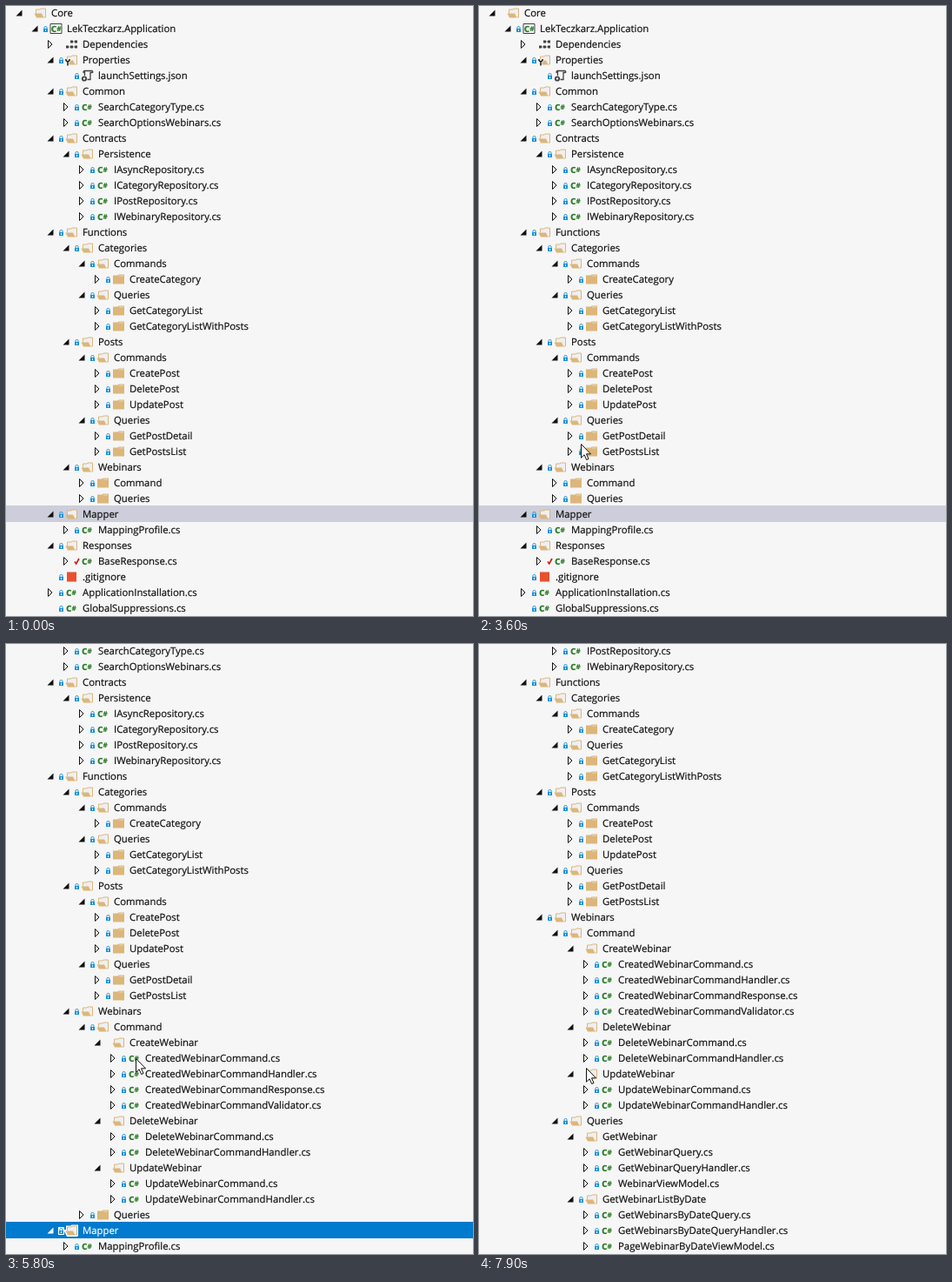
An HTML page for the animation above (8000 ms loop, 537x701 px).

```html
<!DOCTYPE html>
<html lang="en">
<head>
<meta charset="utf-8">
<title>Solution tree</title>
<style>
  html, body { margin: 0; width: 100%; height: 100%; overflow: hidden; background: #f6f6f6; }
  svg { display: block; width: 537px; height: 701px; }
  text { font-family: "Open Sans", "Noto Sans", sans-serif; font-size: 11.35px; text-rendering: geometricPrecision; white-space: pre; }
  .name { stroke-width: .2px; }
  .cs { font-size: 10px; font-weight: 800; fill: #2f7d2c; }
  .cs tspan { font-size: 8px; }
  .tip { font-size: 11.4px; fill: #575757; }
</style>
</head>
<body>
<svg viewBox="0 0 537 701">
  <rect width="537" height="701" fill="#f6f6f6"/>
  <g id="rows"></g>
  <g id="tip">
    <rect x=".5" y=".5" width="72" height="24" fill="#f6f6f6" stroke="#767676"/>
    <text class="tip" x="7" y="17">Checked in</text>
  </g>
  <path id="cursor" d="M.5 .5V16.2L4.1 12.8L6.7 18.5L9 17.5L6.5 11.8H11.5Z" fill="#fff" stroke="#111" stroke-width="1"/>
</svg>
<script>
const LOOP = 8000, STEP = 100, ROW = 18, VISIBLE = 39;

// depth, arrow (v open, > closed, . none, a/b opened later), icon, mark, name
const tree = `
0vf- Core
1vpl LekTeczkarz.Application
2>d- Dependencies
2vwl Properties
3.jl launchSettings.json
2vfl Common
3>cl SearchCategoryType.cs
3>cl SearchOptionsWebinars.cs
2vfl Contracts
3vfl Persistence
4>cl IAsyncRepository.cs
4>cl ICategoryRepository.cs
4>cl IPostRepository.cs
4>cl IWebinaryRepository.cs
2vfl Functions
3vfl Categories
4vfl Commands
5>fl CreateCategory
4vfl Queries
5>fl GetCategoryList
5>fl GetCategoryListWithPosts
3vfl Posts
4vfl Commands
5>fl CreatePost
5>fl DeletePost
5>fl UpdatePost
4vfl Queries
5>fl GetPostDetail
5>fl GetPostsList
3vfl Webinars
4afl Command
5vf- CreateWebinar
6>cl CreatedWebinarCommand.cs
6>cl CreatedWebinarCommandHandler.cs
6>cl CreatedWebinarCommandResponse.cs
6>cl CreatedWebinarCommandValidator.cs
5vf- DeleteWebinar
6>cl DeleteWebinarCommand.cs
6>cl DeleteWebinarCommandHandler.cs
5vf- UpdateWebinar
6>cl UpdateWebinarCommand.cs
6>cl UpdateWebinarCommandHandler.cs
4bfl Queries
5vf- GetWebinar
6>cl GetWebinarQuery.cs
6>cl GetWebinarQueryHandler.cs
6>cl WebinarViewModel.cs
5vfl GetWebinarListByDate
6>cl GetWebinarsByDateQuery.cs
6>cl GetWebinarsByDateQueryHandler.cs
6>cl PageWebinarByDateViewModel.cs
2vfl Mapper
3>cl MappingProfile.cs
2vfl Responses
3>cr BaseResponse.cs
2.gl .gitignore
2>cl ApplicationInstallation.cs
2.cl GlobalSuppressions.cs
1vpl LekTeczkarz.Domain
2>d- Dependencies
2>fl Common`.trim().split('\n').map(line => {
  const [depth, arrow, icon, mark] = line;
  return { depth: +depth, arrow, icon, mark, name: line.slice(5) };
});

// time, x, y of the pointer tip
const pointer = [
  [100, 522, 35], [500, 522, 35], [1400, 197, 176], [2000, 122, 280], [2200, 126, 300],
  [2300, 129, 305], [3200, 116, 435], [3600, 117, 503], [4100, 117, 503], [4200, 117, 504],
  [4400, 117, 504], [4700, 98, 505], [4900, 88, 492], [5300, 88, 492], [5400, 134, 481],
  [5600, 134, 481], [5800, 149, 476], [6100, 149, 476], [6200, 147, 476], [6500, 147, 476],
  [7200, 88, 597], [7400, 88, 597], [7500, 88, 595], [7600, 88, 595], [7900, 123, 487]
];

// [from, first row shown]
const scrolls = [[0, 0], [3700, 3], [5800, 6], [6000, 9], [7300, 12]];
// [from, to, x, y]
const tips = [[4500, 4900, 117, 507], [6200, 6700, 149, 479]];

const TAN = '#dcb67a', DARK = '#424242';
const at = (x, y, body) => `<g transform="translate(${x} ${y})">${body}</g>`;
const shape = (d, attrs) => `<path d="${d}" ${attrs}/>`;
const fill = (d, color) => shape(d, `fill="${color}"`);
const line = (d, color, width = 1) => shape(d, `fill="none" stroke="${color}" stroke-width="${width}"`);

const FLAP = 'M-7 .5H1.5L4 5.5H-4.5Z';
const BACK = 'M-5 .5V-4H-.5L.5 -5H6V5H4';

function folder(open, halo) {
  if (!open) return fill('M-6.5 -4.5H-1L0 -5.5H6.5V5.5H-6.5Z', TAN) + line('M.5 -4H5.5', '#f0e2c8', .8);
  const glow = halo ? line(BACK + FLAP, '#fff', 3) : '';
  return glow + shape(BACK, `fill="#f0eff1" stroke="${TAN}"`) + fill(FLAP, TAN);
}

const sharp = (x, y) => `<text class="cs" x="${x}" y="${y}">C<tspan dy="-1">#</tspan></text>`;
const WRENCH = 'M-4.5 6.5V2.5M-6.5 -1V.5Q-4.5 3 -2.5 .5V-1';

const icons = {
  f: folder,
  c: () => sharp(-6.5, 3.5),
  p: () => shape('M-6.5 -5.5H6.5V5.5H-6.5Z', `fill="#f6f6f6" stroke="${DARK}"`) + sharp(-5.8, 3.5),
  d: () => fill('M-1.5 -4.5h3v3h-3zM3.5 -4.5h3v3h-3zM-1.5 1.5h3v3h-3zM3.5 1.5h3v3h-3zM-6.5 1.5h3v3h-3z', DARK) +
    line('M-1 -3h5M-4 3h8', DARK, .7),
  w: () => folder(true) + line(WRENCH, '#f6f6f6', 3.2) + line(WRENCH, '#1e1e1e', 1.5),
  j: () => line('M-3 0V-5.5H5.5Q7.5 -3.5 5 -3.5H3.5V4.5H0M-3 -5.5Q-5.5 -5 -4 -3', DARK, 1.3) +
    '<circle cx="-3.5" cy="3.5" r="2.2" fill="#f6f6f6" stroke="#424242" stroke-width="1.8"/>',
  g: () => '<rect x="-5.5" y="-5.5" width="11" height="11" fill="#e8502f"/>'
};

const marks = {
  '-': () => '',
  l: halo => (halo ? fill('M-3.5 -1V-4H3.5V-1V5H-3.5Z', '#fff') : '') +
    line('M-1.5 0V-1.5Q-1.5 -2.5 0 -2.5T1.5 -1.5V0', '#1b93d8') +
    fill('M-2.5 0H2.5V4H-2.5Z', '#1b93d8') + fill('M-.5 1H.5V3H-.5Z', '#e8f4fc'),
  r: () => line('M-2.5 .5L-.8 3L2.5 -3', '#c8201e', 1.7)
};

function arrow(open, color) {
  return open ? fill('M3.5 -3.5V3.5H-3.5Z', color) : line('M-2.5 -4.5L2 0L-2.5 4.5Z', color);
}

function drawRow(row, index, view) {
  const y = 8 + ROW * index, x = ROW * row.depth;
  const selected = row.name === 'Mapper', active = selected && view.focused;
  const ink = active ? '#fff' : '#111';
  const open = view.isOpen(row);
  let out = selected
    ? `<rect x="0" y="${y - 10}" width="537" height="19" fill="${active ? '#007acc' : '#cccedb'}"/>` : '';
  if (row.arrow !== '.') out += at(x + 15, y, arrow(open, row.arrow === view.hover ? '#1c97ea' : ink));
  out += at(x + 27.5, y, marks[row.mark](active));
  out += at(x + 39.5, y, icons[row.icon](open, active));
  return out + `<text class="name" x="${x + 52}" y="${y + 4}" fill="${ink}" stroke="${ink}">${row.name}</text>`;
}

function visibleRows(isOpen) {
  let limit = Infinity;
  return tree.filter(row => {
    if (row.depth > limit) return false;
    limit = isOpen(row) ? Infinity : row.depth;
    return true;
  });
}

function pointerAt(t) {
  const next = pointer.findIndex(key => key[0] >= t);
  if (next < 1) return pointer[Math.max(next, 0)].slice(1);
  const [t0, x0, y0] = pointer[next - 1], [t1, x1, y1] = pointer[next];
  const k = (t - t0) / (t1 - t0);
  return [Math.round(x0 + (x1 - x0) * k), Math.round(y0 + (y1 - y0) * k)];
}

const $ = id => document.getElementById(id);
const place = (el, x, y) => el.setAttribute('transform', `translate(${x} ${y})`);
const show = (el, on) => el.setAttribute('visibility', on ? 'visible' : 'hidden');

function render(t) {
  const opened = { v: true, a: t >= 5000, b: t >= 7300 };
  const view = {
    isOpen: row => !!opened[row.arrow],
    focused: t >= 5000,
    hover: t >= 4900 && t < 5400 ? 'a' : t >= 7200 && t < 7300 ? 'b' : ''
  };
  const first = scrolls.filter(([from]) => t >= from).pop()[1];
  $('rows').innerHTML = visibleRows(view.isOpen).slice(first, first + VISIBLE)
    .map((row, i) => drawRow(row, i, view)).join('');

  const tip = tips.find(([from, to]) => t >= from && t < to);
  show($('tip'), tip);
  if (tip) place($('tip'), tip[2], tip[3]);

  show($('cursor'), t >= 100);
  place($('cursor'), ...pointerAt(t));
}

const start = performance.now();
let last = -1;
function tick() {
  const elapsed = Math.max(0, performance.now() - start) % LOOP;
  const t = Math.floor(elapsed / STEP) * STEP;
  if (t !== last) render(last = t);
  requestAnimationFrame(tick);
}
tick();
</script>
</body>
</html>
```
